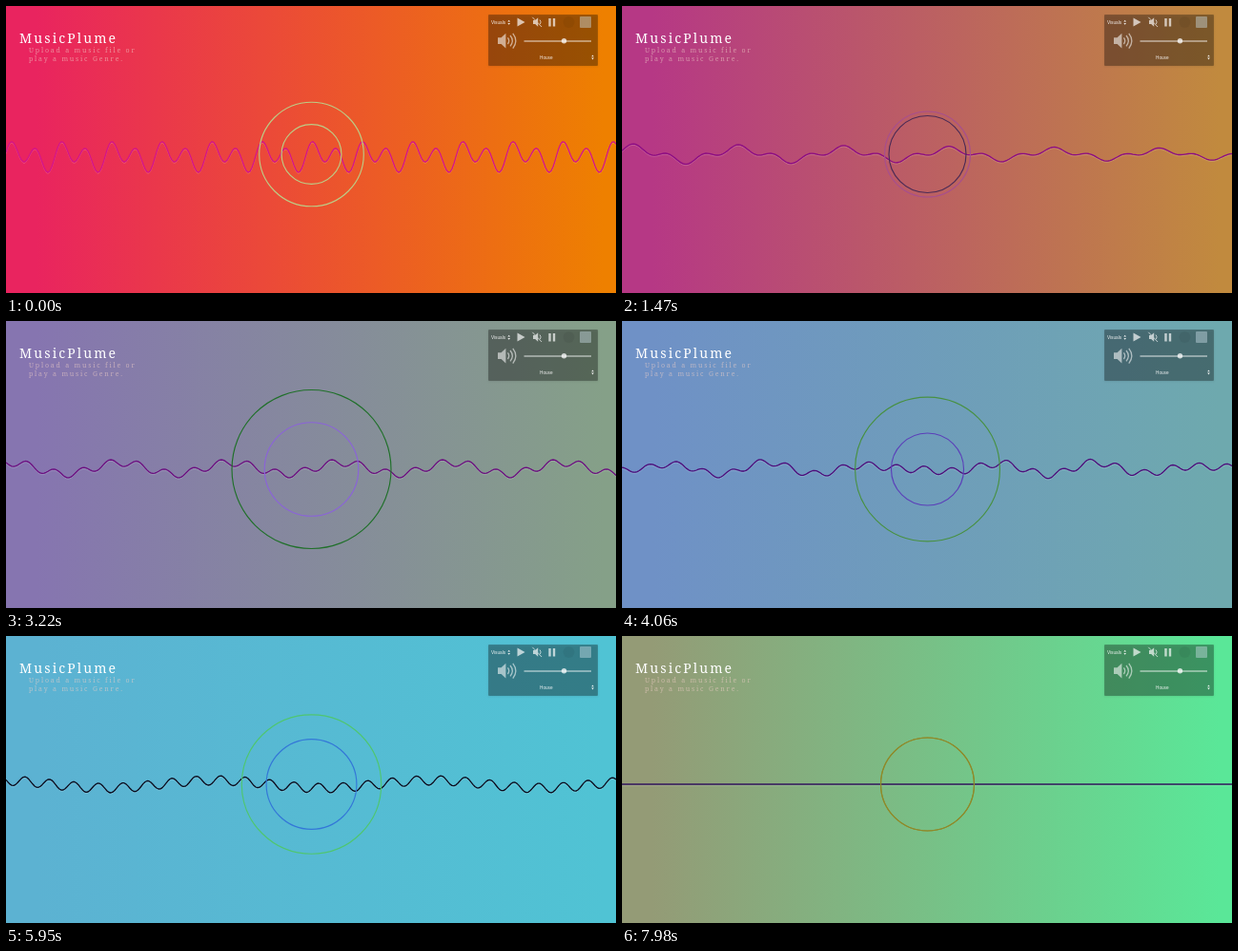
These frames come from a looping animation (640x302 px, 8050 ms). An HTML page:

```html
<!DOCTYPE html>
<html lang="en">
<head>
<meta charset="utf-8">
<title>Music visualizer</title>
<style>
  html, body { margin: 0; width: 100%; height: 100%; overflow: hidden; }
  svg { display: block; width: 100vw; height: 100vh; }
  .serif { font-family: "Noto Serif", serif; }
  .sans { font-family: "Liberation Sans", Arial, sans-serif; }
</style>
</head>
<body>
<svg viewBox="0 0 640 302" preserveAspectRatio="none">
  <defs>
    <linearGradient id="bg">
      <stop id="left" offset=".05"/><stop id="right" offset=".98"/>
    </linearGradient>
    <filter id="soft" x="-10%" y="-10%" width="120%" height="130%">
      <feGaussianBlur stdDeviation="1"/>
    </filter>
  </defs>
  <rect width="640" height="302" fill="url(#bg)"/>

  <g fill="none" stroke-linejoin="round">
    <path id="glow" stroke="#fff" stroke-opacity=".15" transform="translate(0 1.3)"/>
    <path id="wave" stroke-width="1.3"/>
    <g stroke-width="1.15">
      <circle id="outer" cx="320.5" cy="156"/>
      <circle id="inner" cx="320.5" cy="156"/>
    </g>
  </g>

  <g class="serif">
    <text x="14" y="39" font-size="14" font-weight="500" letter-spacing="2.1" fill="#fff">MusicPlume</text>
    <g font-size="7" letter-spacing="1.8" fill="#f0d0c8" fill-opacity=".6">
      <text x="24" y="49.3">Upload a music file or</text>
      <text x="24" y="58.3">play a music Genre.</text>
    </g>
  </g>

  <rect x="506" y="9.5" width="115" height="54" fill-opacity=".1" filter="url(#soft)"/>
  <rect x="506" y="9" width="115" height="54" rx="1" fill-opacity=".29"/>
  <g class="sans" font-size="4.7" fill="#fff" fill-opacity=".9">
    <text x="509" y="19">Visuals</text>
    <text x="560" y="55.5">House</text>
    <path id="arrows" d="M526.4 16.6l1.3-1.8 1.3 1.8zm0 1.4l1.3 1.8 1.3-1.8z"/>
    <use href="#arrows" x="87.8" y="36.6"/>
  </g>
  <g fill="#fff" opacity=".68">
    <path d="M536.5 12.5v9l8-4.5z"/>
    <path d="M553 15h2.2l3-2.8v9.6l-3-2.8H553z"/>
    <path d="M569.3 13h2.4v8.4h-2.4zm4.5 0h2.4v8.4h-2.4z"/>
    <path d="M552.3 11.8l9.8 10.2M560 14.5q2 2.2 .4 4.6" fill="none" stroke="#fff"/>
  </g>
  <g fill="#fff" opacity=".56">
    <path d="M516 33.2h3.6l4.8-4.4v15.6l-4.8-4.4H516z"/>
    <path d="M526.4 33.4q2.6 3.3 0 6.6M529 31q4.6 5.6 0 11.4M531.8 28.8q6 7.8 0 15.8" fill="none" stroke="#fff" stroke-width="1.3"/>
    <path d="M543.5 37h70.5" stroke="#fff" stroke-width="1.5"/>
  </g>
  <circle cx="585.5" cy="36.8" r="2.7" fill="#fff" fill-opacity=".75"/>
  <circle cx="590.5" cy="17" r="6" fill-opacity=".05"/>
  <rect x="602" y="11" width="12" height="12" rx="1" fill="#cfe2ec" fill-opacity=".42"/>
</svg>

<script>
const STEP = 70, LOOP = 8050, MID = 156;
const $ = id => document.getElementById(id);
const lerp = (a, b, k) => a + (b - a) * k;
const rand = n => { const v = Math.sin(n * 127.1 + 11.7) * 43758.5453; return v - Math.floor(v); };

function mixColor(a, b, k) {
  const part = (c, i) => parseInt(c.slice(i, i + 2), 16);
  return `rgb(${[1, 3, 5].map(i => Math.round(lerp(part(a, i), part(b, i), k))).join()})`;
}

// sound: sines as [amplitude, period, x of a trough]; drop lowers them, fade weakens them to the right
const poses = [
  { step: 0, left: "#e9245f", right: "#ee8000", ink: "#d41488",
    outer: [54.8, "#bdcb85"], inner: [31.4, "#bdcb85"],
    sound: [[11.5, 26.3, 18.2], [6.5, 52.6, 39.7]], drop: 2, fade: 0 },
  { step: 21, left: "#b63885", right: "#c18a3e", ink: "#8c0c84",
    outer: [45, "#a84f8c"], inner: [40.5, "#4a2a56"],
    sound: [[7, 110.5, 67], [4, 36.8, 67]], drop: 0, fade: .45 },
  { step: 46, left: "#8675b0", right: "#85a088", ink: "#6c0e80",
    outer: [83.5, "#20702a"], inner: [49.3, "#8b63d9"],
    sound: [[6, 116, 62], [4, 29, 36.5]], drop: -1, fade: 0 },
  { step: 70, left: "#58acdc", right: "#56b1d3", ink: "#2e0c76",
    outer: [80.3, "#6fb25a"], inner: [41.4, "#2a1b98"],
    sound: [[3.5, 85.5, 135], [1.5, 28.5, 132]], drop: 0, fade: 0 },
  { step: 85, left: "#5cb2d2", right: "#50c3d4", ink: "#0a0a1c",
    outer: [73.2, "#4fc670"], inner: [47.4, "#3377d8"],
    sound: [[5, 25.67, 32.8], [4, 228, 105]], drop: 0, fade: 0 },
  { step: 97, left: "#73a8a8", right: "#52d5ba", ink: "#2c145c",
    outer: [58.3, "#262060"], inner: [42.4, "#28684a"],
    sound: [[4.5, 25.75, 20.4], [4, 208, 152]], drop: 0, fade: 0 },
  { step: 114, left: "#949b76", right: "#5ae798", ink: "#32145c",
    outer: [49, "#8f8a2a"], inner: [49, "#8f8a2a"],
    sound: [], drop: 0, fade: 0 }
];

function height({ sound, drop, fade }, x, shift) {
  const sum = sound.reduce((y, [amp, period, trough]) =>
    y + amp * Math.cos(2 * Math.PI * (x + shift - trough) / period), 0);
  return drop + sum * (1 - fade * x / 640);
}

function wavePath(a, b, k, shift) {
  const norm = Math.hypot(1 - k, k); // keeps the loudness while two sounds overlap
  const points = [];
  for (let x = 0; x <= 640; x += 2) {
    const y = MID + lerp(height(a, x, shift), height(b, x, shift), k) / norm;
    points.push(x + " " + y.toFixed(1));
  }
  return "M" + points.join("L");
}

function setRing(id, a, b, k, seed) {
  const jitter = 22 * Math.sin(Math.PI * k) * (rand(seed) - .5);
  $(id).setAttribute("r", (lerp(a[id][0], b[id][0], k) + jitter).toFixed(2));
  $(id).setAttribute("stroke", mixColor(a[id][1], b[id][1], k));
}

function draw(t) {
  let n = Math.floor((t % LOOP) / STEP);
  if (n === 31 || n === 76) n--; // held ticks
  const next = Math.max(1, poses.findIndex(p => p.step >= n));
  const a = poses[next - 1], b = poses[next];
  const k = (n - a.step) / (b.step - a.step);

  for (const side of ["left", "right"])
    $(side).setAttribute("stop-color", mixColor(a[side], b[side], k));

  const shift = k === 0 || k === 1 ? 0 : rand(n) * 640;
  const d = wavePath(a, b, k, shift);
  $("glow").setAttribute("d", d);
  $("wave").setAttribute("d", d);
  $("wave").setAttribute("stroke", mixColor(a.ink, b.ink, k));

  setRing("outer", a, b, k, n + 300);
  setRing("inner", a, b, k, n + 600);
}

const start = performance.now();
function tick() {
  draw(performance.now() - start);
  requestAnimationFrame(tick);
}
tick();
</script>
</body>
</html>
```
